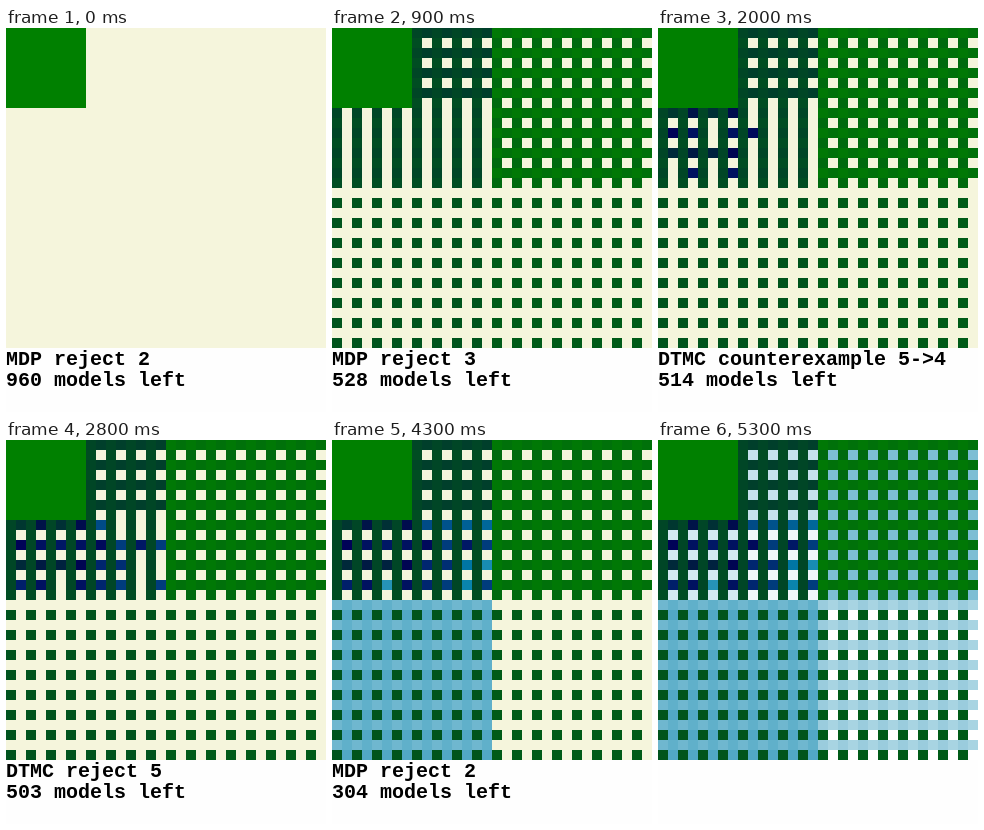
An HTML page for the animation above (6.4 s loop, 320x384 px).

```html
<!DOCTYPE html>
<html lang="en">
<head>
<meta charset="utf-8">
<title>Model space pruning</title>
<style>
  html, body { margin: 0; width: 100%; height: 100%; overflow: hidden; background: #fefefe; }
  svg { display: block; width: 320px; height: 384px; }
  text { font: bold 20px "Courier New", "Liberation Mono", monospace; white-space: pre; }
</style>
</head>
<body>
<svg id="stage" viewBox="0 0 320 384">
  <rect width="320" height="320" fill="#f5f5dc"/>
  <g id="cells" shape-rendering="crispEdges"></g>
  <text id="verdict" x="0" y="337"></text>
  <text id="remaining" x="0" y="358"></text>
</svg>
<script>
const SIZE = 32, CELL = 10, STEP_MS = 100, LAST_STEP = 53, LOOP_MS = 6400;
const EMPTY = "#f5f5dc";

// Parity classes of a cell: column then row, "e" even and "o" odd.
const parity = (x, y) => (x % 2 ? "o" : "e") + (y % 2 ? "o" : "e");

// All cells of a square block, optionally of one parity class only.
function block(x0, y0, size, kind) {
  const found = [];
  for (let y = y0; y < y0 + size; y++)
    for (let x = x0; x < x0 + size; x++)
      if (!kind || parity(x, y) === kind) found.push([x, y]);
  return found;
}

const reject2 = "MDP reject 2", reject3 = "MDP reject 3";
const reject5 = "DTMC reject 5", generalised = "DTMC counterexample 5->4";

const events = [
  [0, reject2, block(0, 0, 8)],
  [1, reject2, block(16, 0, 16, "ee")],
  [2, reject2, block(16, 0, 16, "oe")],
  [3, reject2, block(16, 0, 16, "eo")],
  [5, reject2, block(16, 16, 16, "eo")],
  [6, reject2, block(0, 16, 16, "eo")],
  [7, reject2, block(0, 0, 16, "eo")],
  [8, reject2, block(0, 0, 16, "ee")],
  [9, reject3, block(8, 0, 8, "oe")],

  [10, reject5, [[1, 8]]],
  [11, reject5, [[5, 8]]],
  [12, reject5, [[1, 12]]],
  [13, reject5, [[5, 12]]],
  [14, reject5, [[3, 12]]],
  [15, reject5, [[3, 8]]],
  [16, reject5, [[7, 8]]],
  [17, reject5, [[7, 12]]],
  [18, reject5, [[1, 10]]],
  [19, reject5, [[9, 10]]],
  [20, generalised, [[3, 10], [7, 10], [3, 14], [7, 14]]],
  [21, generalised, [[5, 10], [13, 10]]],
  [22, reject5, [[1, 14]]],
  [23, generalised, [[9, 12], [9, 14]]],
  [24, reject5, [[11, 12]]],
  [26, generalised, [[11, 10], [15, 10], [11, 14], [15, 14]]],
  [28, reject5, [[9, 8]]],
  [29, reject5, [[11, 8]]],
  [30, generalised, []],
  [31, reject5, [[13, 8]]],
  [32, reject5, [[15, 8]]],
  [34, reject5, [[13, 12]]],
  [35, generalised, []],
  [36, reject5, [[13, 14]]],
  [37, reject5, [[15, 12]]],
  [38, reject5, [[5, 14]]],

  [41, reject2, block(0, 16, 16, "oo")],
  [42, reject2, block(0, 16, 16, "oe")],
  [43, reject2, block(0, 16, 16, "ee")],
  [44, reject2, block(16, 0, 16, "oo")],
  [46, reject2, block(16, 16, 16, "ee")],
  [47, reject2, block(16, 16, 16, "oe")],
  [49, reject3, block(8, 0, 8, "oo")],
  [50, reject3, block(0, 8, 8, "oo")],
  [52, reject3, block(8, 8, 8, "oo")],
  [53, "", block(16, 16, 16, "oo")]
];

// Green through navy to white.
function stepColor(step) {
  const v = step / LAST_STEP;
  const channels = [3 * v - 2, Math.abs(3 * v - 1) / 2, v];
  return `rgb(${channels.map(c => Math.round(255 * Math.max(0, Math.min(1, c))))})`;
}

const cellLayer = document.getElementById("cells");
const verdict = document.getElementById("verdict");
const remaining = document.getElementById("remaining");

// Each cell keeps the first event that rejects it.
const cells = new Map();
const captions = [];
for (const [step, label, members] of events) {
  for (const [x, y] of members) {
    const key = y * SIZE + x;
    if (cells.has(key)) continue;
    const node = document.createElementNS("http://www.w3.org/2000/svg", "rect");
    const attributes = { x: x * CELL, y: y * CELL, width: CELL, height: CELL, fill: EMPTY };
    for (const name in attributes) node.setAttribute(name, attributes[name]);
    cellLayer.append(node);
    cells.set(key, { node, step });
  }
  captions.push({ step, label, left: SIZE * SIZE - cells.size });
}

let shownStep = -1;
function render(time) {
  const step = Math.min(LAST_STEP, Math.floor((time % LOOP_MS) / STEP_MS));
  if (step === shownStep) return;
  shownStep = step;
  for (const cell of cells.values())
    cell.node.setAttribute("fill", cell.step <= step ? stepColor(cell.step) : EMPTY);
  const caption = captions.filter(c => c.step <= step).pop();
  verdict.textContent = caption.label;
  remaining.textContent = caption.label && `${caption.left} models left`;
}

const start = performance.now();
function tick() {
  render(performance.now() - start);
  requestAnimationFrame(tick);
}
tick();
</script>
</body>
</html>
```
